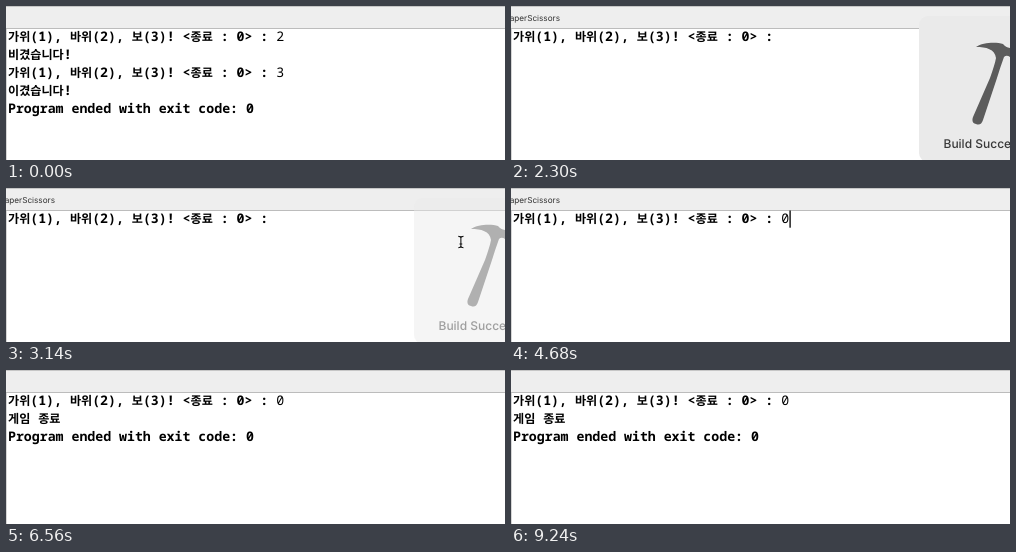
Animation of 499x154 px, one loop 9.9 s. Source, as an HTML page with a canvas:

```html
<!DOCTYPE html>
<html lang="ko">
<head>
<meta charset="utf-8">
<style>
html, body { margin: 0; width: 100%; height: 100%; overflow: hidden; background: #fff; }
canvas { display: block; width: 499px; height: 154px; }
</style>
</head>
<body>
<canvas id="stage" width="499" height="154"></canvas>
<script>
const W = 499, H = 154, LOOP = 9900, TICK = 20;
const ctx = document.getElementById('stage').getContext('2d');
const LATIN = '13.23px "Noto Sans Mono", monospace';
const HANGUL = '12.1px "Noto Sans CJK KR", "Noto Sans CJK", sans-serif';
const PROMPT = '가위(1), 바위(2), 보(3)! <종료 : 0> : ';
const ENDED = 'Program ended with exit code: 0';

const within = (t, a, b) => t >= a && t < b;
const mix = (a, b, p) => a + (b - a) * p;
const progress = (t, a, b) => Math.min(1, Math.max(0, (t - a) / (b - a)));

// Sets Hangul and Latin runs one after another; returns the end x.
function write(text, x, y, weight = 'bold') {
  ctx.fillStyle = '#000';
  for (const run of text.match(/[가-힣]+|[^가-힣]+/g)) {
    ctx.font = `${weight} ${/[가-힣]/.test(run) ? HANGUL : LATIN}`;
    ctx.fillText(run, x, y);
    x += ctx.measureText(run).width;
  }
  return x;
}

const lineY = row => 34.8 + row * 18.1;

function prompt(row, answer) {
  const x = write(PROMPT, 2, lineY(row));
  if (answer) write(answer, x, lineY(row), 'normal');
}

function caret(x, row) {
  ctx.fillStyle = '#111';
  ctx.fillRect(x, 22.5 + row * 18, 1.4, 17.2);
}

function chrome() {
  ctx.fillStyle = '#fff';
  ctx.fillRect(0, 0, W, H);
  ctx.fillStyle = '#eeeeee';
  ctx.fillRect(0, 0, W, 22);
  ctx.fillStyle = '#c6c6c6';
  ctx.fillRect(0, 0, W, 1);
  ctx.fillStyle = '#bcbcbc';
  ctx.fillRect(0, 22, W, 1);
  ctx.fillStyle = '#d6d6d6';
  ctx.fillRect(0, 23, 1, H - 23);
}

function title(text, right) {
  ctx.font = '8.2px Inter, sans-serif';
  ctx.fillStyle = '#333';
  ctx.textAlign = 'right';
  ctx.fillText(text, right, 14.6);
  ctx.textAlign = 'left';
}

function consoleText(t) {
  if (t < 820) {
    prompt(0, '2');
    write('비겼습니다!', 2, lineY(1));
    prompt(2, '3');
    write('이겼습니다!', 2, lineY(3));
    write(ENDED, 2, lineY(4));
    return;
  }
  if (t >= 2300) prompt(0, t >= 4680 ? '0' : '');
  if (t >= 5560) write('게임 종료', 2, lineY(1));
  if (t >= 5880) write(ENDED, 2, lineY(2));

  if (within(t, 3540, 4180)) caret(270.4, 0);
  if (within(t, 4680, 5360)) caret(278.4, 0);
  if (within(t, 5560, 5880)) caret(2.4, 2);
  if (within(t, 5880, 6560) || within(t, 7220, 7900) || within(t, 8560, 9240)) caret(248.4, 2);
}

function hammer() {
  ctx.fillStyle = '#5c5c5c';
  ctx.beginPath();
  ctx.moveTo(465, 41);
  ctx.bezierCurveTo(472, 36, 486, 36, 492, 38);
  ctx.quadraticCurveTo(495, 42, 500, 42);
  ctx.lineTo(500, 52);
  ctx.quadraticCurveTo(496, 48, 493, 51);
  ctx.quadraticCurveTo(489, 62, 486, 72);
  ctx.lineTo(472, 114);
  ctx.quadraticCurveTo(470, 120, 465, 118);
  ctx.quadraticCurveTo(460, 117, 462, 111);
  ctx.lineTo(479, 72);
  ctx.quadraticCurveTo(484, 58, 485, 52);
  ctx.bezierCurveTo(484, 43, 475, 41, 465, 41);
  ctx.fill();
}

function panel(alpha) {
  ctx.save();
  ctx.globalAlpha = alpha;
  ctx.fillStyle = '#eaeaea';
  ctx.beginPath();
  ctx.roundRect(408, 10, 184, 146, 9);
  ctx.fill();
  hammer();
  ctx.font = '500 12px Inter, sans-serif';
  ctx.fillStyle = '#383838';
  ctx.fillText('Build Succeeded', 432.5, 142.4);
  ctx.restore();
}

function pointerAt(t) {
  if (within(t, 2740, 4680)) {
    if (t < 3040) {
      const p = progress(t, 2740, 2820);
      return [mix(495, 470, p), mix(67, 66, p)];
    }
    const p = progress(t, 3020, 3240);
    return [mix(470, 425, p ** 1.8), mix(66, 40.5, p ** 1.25)];
  }
  if (within(t, 6640, 6720)) {
    const p = progress(t, 6640, 6700);
    return [mix(425, 482, p), mix(40.5, 58, p)];
  }
  return null;
}

function iBeam([x, y]) {
  ctx.beginPath();
  for (const s of [-1, 1]) {
    ctx.moveTo(x - 2.6, y + 5.7 * s);
    ctx.quadraticCurveTo(x, y + 5.7 * s, x, y + 4 * s);
    ctx.quadraticCurveTo(x, y + 5.7 * s, x + 2.6, y + 5.7 * s);
  }
  ctx.moveTo(x, y - 4.5);
  ctx.lineTo(x, y + 4.5);
  ctx.moveTo(x - 1.4, y + 2);
  ctx.lineTo(x + 1.4, y + 2);
  ctx.lineWidth = 2.2;
  ctx.strokeStyle = '#fff';
  ctx.stroke();
  ctx.lineWidth = 1.1;
  ctx.strokeStyle = '#111';
  ctx.stroke();
}

function draw(t) {
  chrome();
  if (within(t, 1680, 2180)) title('No Selection', 24.7);
  if (within(t, 2180, 5700)) title('RockPaperScissors', 49);
  consoleText(t);
  if (within(t, 820, 3240)) panel(1 - progress(t, 3020, 3240));
  const pointer = pointerAt(t);
  if (pointer) iBeam(pointer);
}

ctx.textRendering = 'geometricPrecision';
const start = performance.now();
function frame() {
  const t = (performance.now() - start) % LOOP;
  draw(Math.floor(t / TICK) * TICK);
  requestAnimationFrame(frame);
}
frame();
</script>
</body>
</html>
```
